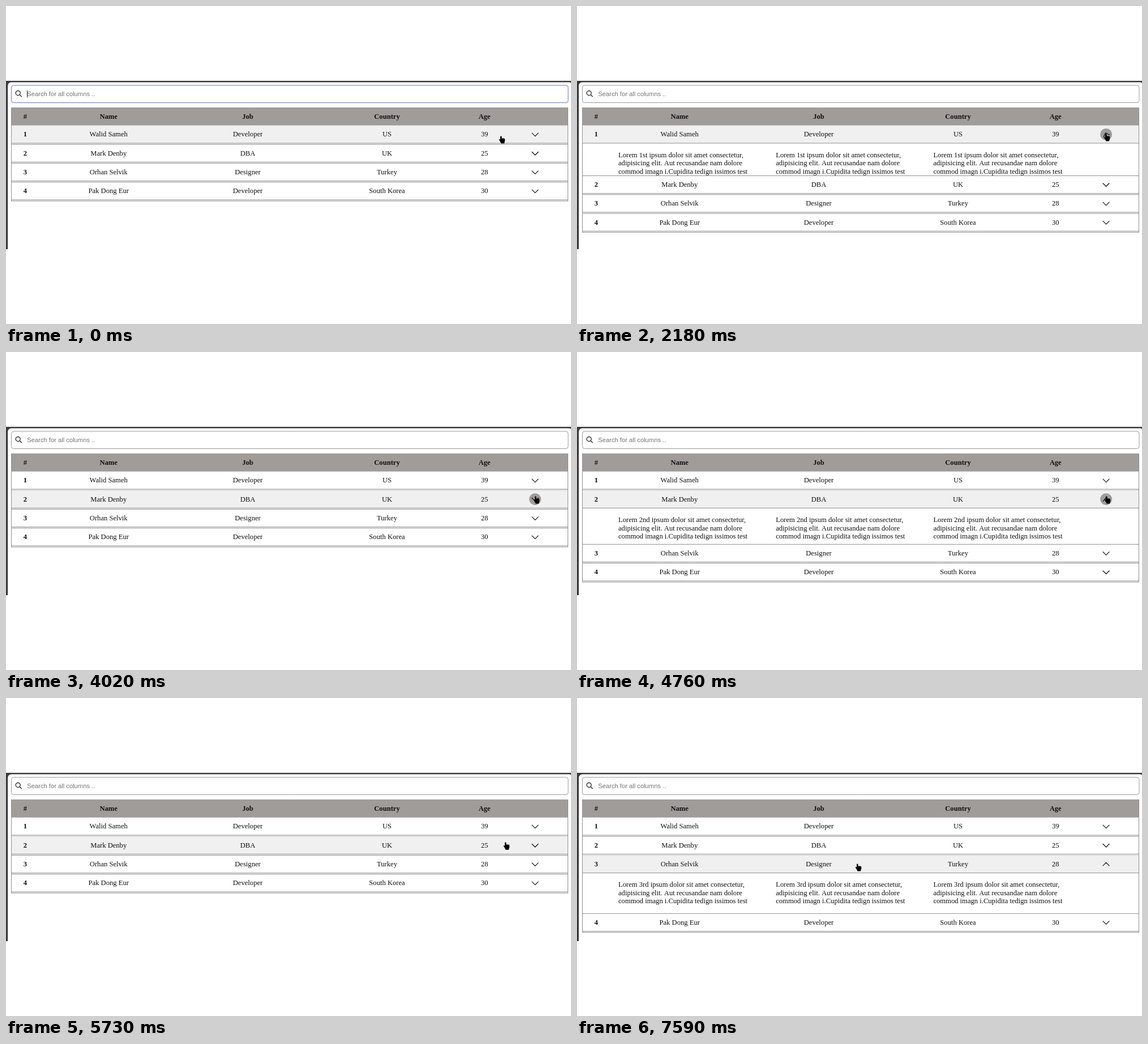
An HTML page with a canvas for the animation above (8000 ms loop, 998 by 561 pixels).

```html
<!DOCTYPE html>
<html lang="en">
<head>
<meta charset="utf-8">
<title>Expandable table rows</title>
<style>
html, body { margin: 0; width: 100%; height: 100%; overflow: hidden; background: #fff; }
canvas { display: block; }
</style>
</head>
<body>
<canvas id="stage" width="998" height="561"></canvas>
<script>
const ctx = document.getElementById('stage').getContext('2d');
const LOOP = 8000, LEFT = 9, RIGHT = 993;
const SERIF = '12.6px "Liberation Serif", "Times New Roman", serif';
const SANS = '11.2px "Liberation Sans", Arial, sans-serif';
const GREY = '#a09c9a', LINE = '#8f8f8f';
const PITCH = 33.3, HALF = 15.6, OPEN = 69.6, FIRST = 226.4;
const BUTTON_X = 934.6;
const COLS = [34, 181.2, 427, 673, 845.2];
const HEAD = ['#', 'Name', 'Job', 'Country', 'Age'];
const ROWS = [
  ['1', 'Walid Sameh', 'Developer', 'US', '39'],
  ['2', 'Mark Denby', 'DBA', 'UK', '25'],
  ['3', 'Orhan Selvik', 'Designer', 'Turkey', '28'],
  ['4', 'Pak Dong Eur', 'Developer', 'South Korea', '30']
];
const ORDINALS = ['1st', '2nd', '3rd', '4th'];
// Click times per row: open, close
const CLICKS = [[1935, 2908], [4458, 5255], [7000, Infinity], [Infinity, Infinity]];
const BLUR = 1900;
// Pointer path: time, x, y
const PATH = [
  [210, 876, 236], [1000, 936, 232], [3420, 936, 232], [3780, 937, 261],
  [5560, 937, 261], [5730, 885, 261], [6130, 497, 286], [6400, 497, 286], [6490, 497, 299]
];

const clamp = v => Math.min(1, Math.max(0, v));

// The CSS "ease" curve, cubic-bezier(.25, .1, .25, 1)
function ease(x) {
  let lo = 0, hi = 1;
  for (let i = 0; i < 20; i++) {
    const s = (lo + hi) / 2;
    const bx = .75 * s * (1 - s) + s ** 3;
    if (bx < x) lo = s; else hi = s;
  }
  return .3 * lo * (1 - lo) ** 2 + 3 * lo * lo * (1 - lo) + lo ** 3;
}

function openness(row, t, duration) {
  const [open, close] = CLICKS[row];
  const step = start => t <= start ? 0 : t >= start + duration ? 1 : ease((t - start) / duration);
  return step(open) - step(close);
}

function pointerAt(t) {
  let i = PATH.findIndex(key => key[0] > t);
  if (i === 0) return PATH[0].slice(1);
  if (i < 0) return PATH[PATH.length - 1].slice(1);
  const [t0, x0, y0] = PATH[i - 1], [t1, x1, y1] = PATH[i];
  const u = clamp((t - t0) / (t1 - t0));
  return [x0 + (x1 - x0) * u, y0 + (y1 - y0) * u];
}

function rect(x, y, w, h, color) {
  ctx.fillStyle = color;
  ctx.fillRect(x, y, w, h);
}

function text(str, x, y, font, align = 'center', color = '#111') {
  ctx.font = font;
  ctx.textAlign = align;
  ctx.fillStyle = color;
  ctx.fillText(str, x, y);
}

const rule = y => rect(LEFT, y - .5, RIGHT - LEFT, 1, LINE);

function stroke(color, width, draw) {
  ctx.strokeStyle = color;
  ctx.lineWidth = width;
  ctx.beginPath();
  draw();
  ctx.stroke();
}

function drawWindow() {
  rect(0, 0, 998, 561, '#fff');
  rect(0, 132, 998, 297, '#3b3939');
  ctx.fillStyle = '#fff';
  ctx.beginPath();
  ctx.roundRect(3.2, 134.6, 994.8, 300, [6, 3, 0, 0]);
  ctx.fill();
  rect(0, 429, 998, 10, '#fff');
}

function drawSearch(t) {
  const focused = t < BLUR;
  const box = () => ctx.roundRect(9.5, 140, 983.5, 30.5, 4);
  if (focused) stroke('#dfe2f6', 2.6, box);
  stroke(focused ? '#8d97d3' : '#999', 1, box);
  stroke('#111', 1.2, () => {
    ctx.arc(21.2, 153.6, 4, 0, 7);
    ctx.moveTo(24.1, 156.5);
    ctx.lineTo(27.8, 160.2);
  });
  text('Search for all columns ..', 37.3, 159, SANS, 'left', '#757575');
  if (focused && t % 1060 < 530) rect(37, 149, 1, 12.5, '#222');
}

function drawChevron(y, turn) {
  ctx.save();
  ctx.translate(BUTTON_X, y + .3);
  ctx.rotate(turn * Math.PI);
  ctx.lineCap = ctx.lineJoin = 'round';
  stroke('#111', 1.2, () => {
    ctx.moveTo(-5.5, -2.5);
    ctx.lineTo(0, 3);
    ctx.lineTo(5.5, -2.5);
  });
  ctx.restore();
}

function drawDetail(row, top, height) {
  const lines = [
    `Lorem ${ORDINALS[row]} ipsum dolor sit amet consectetur,`,
    'adipisicing elit. Aut recusandae nam dolore',
    'commod imagn i.Cupidita tedign issimos test'
  ];
  ctx.save();
  ctx.beginPath();
  ctx.rect(LEFT, top, RIGHT - LEFT, height);
  ctx.clip();
  for (const x of [73, 351.2, 629.4])
    lines.forEach((line, i) => text(line, x, top + 24.6 + i * 14.6, SERIF, 'left'));
  ctx.restore();
}

function drawTable(t, tipX, tipY) {
  rect(LEFT, 179, RIGHT - LEFT, 31.8, GREY);
  HEAD.forEach((label, i) => text(label, COLS[i], 199.2, 'bold ' + SERIF));
  let y = FIRST;
  ROWS.forEach((cells, row) => {
    const top = y - HALF, bottom = y + HALF;
    const extra = OPEN * openness(row, t, 500);
    if (tipY >= top && tipY < bottom + 2) rect(LEFT, top, RIGHT - LEFT, bottom - top, '#f0f0f0');
    if (Math.hypot(tipX - BUTTON_X, tipY - y) < 10.5) {
      ctx.fillStyle = GREY;
      ctx.beginPath();
      ctx.arc(BUTTON_X, y, 10.5, 0, 7);
      ctx.fill();
    }
    cells.forEach((cell, i) => text(cell, COLS[i], y + 4, (i ? '' : 'bold ') + SERIF));
    drawChevron(y, openness(row, t, 400));
    if (extra > 1) drawDetail(row, bottom, extra + 2);
    rule(bottom);
    y += PITCH + extra;
    rule(y - HALF);
  });
  const height = y - HALF - 179;
  rect(LEFT, 179, 1, height, LINE);
  rect(RIGHT - 1, 179, 1, height, LINE);
}

function drawPointer(x, y) {
  ctx.save();
  ctx.translate(x, y);
  ctx.fillStyle = '#000';
  ctx.beginPath();
  ctx.roundRect(-3, -6.5, 2.6, 9, 1.3);
  ctx.roundRect(-3, -2.6, 8.2, 7, 1.8);
  ctx.roundRect(-2, 1, 6.4, 5.6, .8);
  ctx.moveTo(-5.4, -.6);
  ctx.lineTo(-4, -1);
  ctx.lineTo(-1, 1.5);
  ctx.lineTo(-1, 5.4);
  ctx.lineTo(-2.4, 4.6);
  ctx.closePath();
  ctx.fill('nonzero');
  ctx.restore();
}

function frame(now) {
  const t = now % LOOP;
  const [x, y] = pointerAt(t);
  drawWindow();
  drawSearch(t);
  drawTable(t, x - 2, y - 6);
  drawPointer(x, y);
  requestAnimationFrame(frame);
}
requestAnimationFrame(frame);
</script>
</body>
</html>
```
